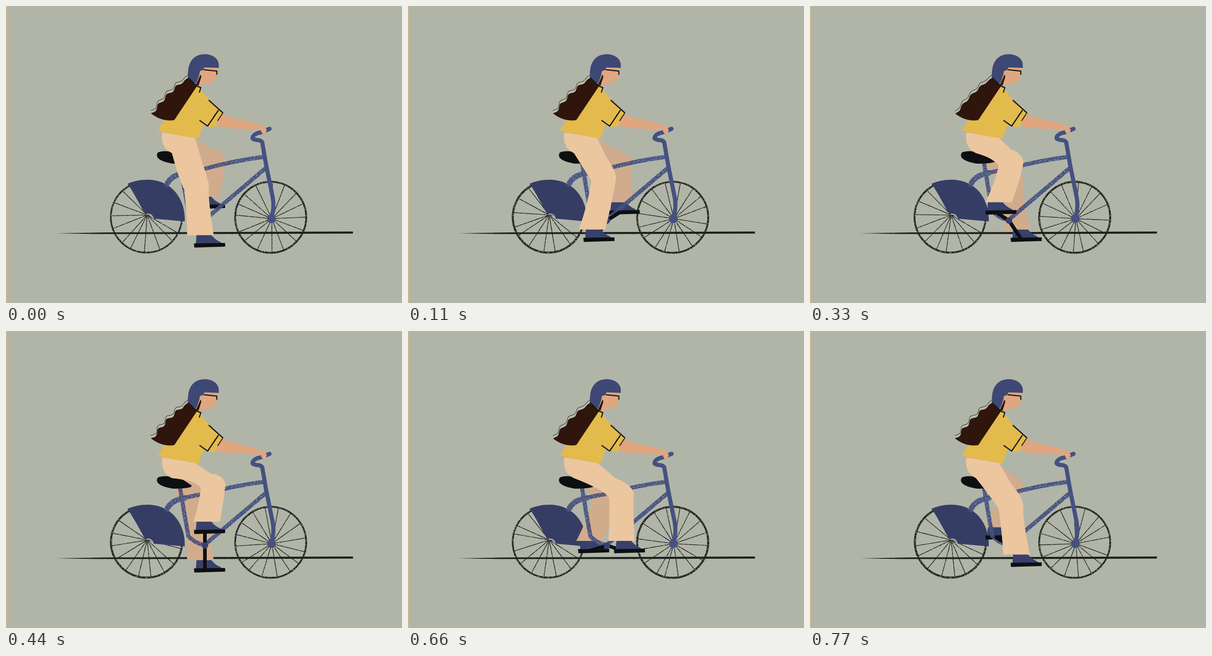
Animation of 864x648 px, one loop 880 ms. Source, as an HTML page:

```html
<!DOCTYPE html>
<html lang="en">
<head>
<meta charset="utf-8">
<title>Cyclist</title>
<style>
  html, body { margin: 0; width: 100%; height: 100%; overflow: hidden; background: #b1b5a8; }
  svg { display: block; width: 100vw; height: 100vh; }
  .pose { visibility: hidden; animation: show 880ms step-end infinite; }
  @keyframes show { 0% { visibility: visible } 12.5%, 100% { visibility: hidden } }
  .line { fill: none; stroke-linecap: round; stroke-linejoin: round; }
  .ink { stroke: #171a18; }
  .tube { stroke: #455180; }
  .blue { fill: #37416c; }
  .black { fill: #0d0f10; }
  .skin { fill: #e0a67f; }
  .hair { fill: #2f150c; }
</style>
</head>
<body>
<svg viewBox="0 0 864 648">
  <defs>
    <filter id="rough" filterUnits="userSpaceOnUse" x="0" y="0" width="864" height="648" color-interpolation-filters="sRGB">
      <feTurbulence type="fractalNoise" baseFrequency=".3" numOctaves="2" seed="4"/>
      <feDisplacementMap in="SourceGraphic" scale="1.6" xChannelSelector="R" yChannelSelector="G"/>
    </filter>
    <filter id="grain" filterUnits="userSpaceOnUse" x="0" y="0" width="864" height="648" color-interpolation-filters="sRGB">
      <feTurbulence type="fractalNoise" baseFrequency=".35" numOctaves="2" seed="9"/>
      <feColorMatrix values="0 0 0 0 0  0 0 0 0 0  0 0 0 0 0  2.2 0 0 0 -.15"/>
      <feComposite in="SourceGraphic" operator="in"/>
    </filter>
  </defs>
  <rect width="864" height="648" fill="#b1b5a8"/>
  <rect width="1.3" height="648" fill="#e3b88e"/>
  <g filter="url(#rough)">
    <path d="M110 496 L220 494 L757 492 V496.5 L450 497.5 L200 497.5Z" fill="#1b2119"/>
    <g id="wheels" filter="url(#grain)"></g>
    <path fill="#363d64" d="M265 388 C300 373 343 376 368 404 C384 422 391 446 390 470 L322 464 C321 456 314 452 304 454 C292 435 280 408 265 388Z"/>
    <path class="line" stroke="#a9ada6" stroke-width="2.5" d="M308 454 Q318 453 321 463"/>
    <g id="farLegs"></g>
    <g class="line tube" stroke-width="9">
      <g filter="url(#grain)">
        <path stroke-width="12" d="M351 389 C358 374 371 368 390 364"/>
        <path d="M385 365 Q410 359 430 356 Q495 338 563 329"/>
        <path d="M380 344 L388 392 L398 448 Q412 463 433 467 L565 355"/>
      </g>
      <path d="M575 268 L555 276 C546 277 537 283 538 289 C545 295 554 290 559 297 L567 344 L582 418 Q586 440 579 462"/>
      <circle cx="579" cy="464" r="5"/>
    </g>
    <path class="black" d="M331 320 C343 313 370 318 387 325 L405 337 C407 343 382 344 365 344 C345 341 323 334 331 320Z"/>
    <g id="cranks"></g>
    <circle class="blue" cx="434" cy="468" r="7"/>
    <g id="nearLegs"></g>
    <path fill="#e3ba4c" d="M409 174 L422 178 Q433 194 444 205 L474 235 L458 263 L441 264 L432 257 L420 289 Q375 283 332 272 Q350 236 368 226Z"/>
    <path class="skin" d="M473 237 C500 247 535 252 563 262 L569 270 L566 280 L559 278 L555 270 C525 268 490 267 470 265 Q458 260 462 249Z"/>
    <path class="line ink" stroke-width="2.6" d="M443 206 L473 233 M463 228 L440 262 L423 250"/>
    <path class="line ink" stroke-width="2" d="M472 235 L462 250"/>
    <path class="skin" d="M430 133 L462 132 L460 150 Q456 169 439 168 L426 173 L416 176 L422 145Z"/>
    <g id="hair"></g>
    <path fill="#3e4874" d="M397 158 C395 127 405 106 434 105 C457 106 467 120 464 135 L433 134 Q429 143 424 141 Q421 155 415 169 L404 164Z"/>
    <path class="hair" d="M425 148 L415 171 L420 174 L426 155Z"/>
    <ellipse class="skin" cx="426" cy="146" rx="3.5" ry="5"/>
    <path class="line ink" stroke-width="2.5" d="M432 139 L460 142 V149 M398 157 L417 175 L425 178 L422 188"/>
  </g>
</svg>
<script>
  const POSES = 8;
  const HIP = { x: 384, y: 300 };
  const FRONT = { x: 412, y: 287 };
  const BRACKET = { x: 434, y: 468 };

  const noise = n => {
    const v = Math.sin(n * 127.1 + 11.7) * 43758.5453;
    return v - Math.floor(v) - 0.5;
  };
  const turn = step => step * 2 * Math.PI / POSES;

  // Step 0 is the bottom of the stroke; the pedal then rises at the back.
  const pedal = step => ({
    x: 444 - 39 * Math.sin(turn(step)),
    y: 480 + 42 * Math.cos(turn(step))
  });

  function leg(step, color) {
    const sole = pedal(step);
    const lean = 2 + 8 * Math.cos(turn(step - 3.3));
    const heel = { x: sole.x - 44 + lean, y: sole.y - 22 };
    const toe = { x: sole.x + 14 + lean, y: sole.y - 22 };
    const ankle = { x: (heel.x + toe.x) / 2, y: heel.y };

    // The knee moves forward and up as the foot comes closer to the hip.
    const reach = Math.hypot(ankle.x - HIP.x, ankle.y - HIP.y);
    const bend = Math.min(1, Math.sqrt(Math.max(0, 206 - reach) / 25));
    const x = (HIP.x + ankle.x) / 2 + 41 * bend;
    const y = (HIP.y + ankle.y) / 2 - 20 * bend;
    const back = { x: x - 27, y: y + 5 };
    const knee = { x: x + 27, y: y - 4 };

    return `<path class="blue" d="M${sole.x - 30} ${sole.y - 2} l2 -23 h30 q8 12 22 18 l8 7Z"/>
      <path class="black" d="M${sole.x - 34} ${sole.y - 4} l68 -1 v8 l-67 2Z"/>
      <path fill="${color}" d="M341 276 C338 300 346 313 362 321
        Q${back.x - 10} ${back.y - 17} ${back.x} ${back.y}
        Q${back.x + (heel.x - back.x) * .4 + 3} ${(back.y + heel.y) / 2} ${heel.x} ${heel.y}
        L${toe.x} ${toe.y} Q${knee.x - 3} ${knee.y + 28} ${knee.x} ${knee.y}
        Q${knee.x - 4} ${knee.y - 20} ${(knee.x + FRONT.x) / 2} ${(knee.y + FRONT.y) / 2}
        L${FRONT.x} ${FRONT.y}Z"/>`;
  }

  function crank(step) {
    const { x, y } = pedal(step);
    return `<path class="line" stroke="#0d0f10" stroke-width="8" d="M${BRACKET.x} ${BRACKET.y} L${x - 10} ${y}"/>`;
  }

  function wheel(cx, cy, hubX, hubY, step, seed) {
    const r = 77.5;
    let spokes = '';
    for (let k = 0; k < 16; k++) {
      const a = turn(k / 2 + step * .2 + noise(k + seed + step * 20) * .2);
      spokes += `M${hubX} ${hubY}L${cx + r * Math.cos(a)} ${cy + r * Math.sin(a)}`;
    }
    return `<g class="line" stroke="#20231f">
      <path stroke-width="1.6" d="${spokes}"/>
      <circle cx="${cx}" cy="${cy}" r="${r}" stroke-width="${4.2 + noise(step + seed)}"/></g>`;
  }

  function hair(step) {
    const amp = 2.6 + noise(step) * 1.6;
    const edge = lift => Array.from({ length: 33 }, (_, i) => {
      const t = i / 32;
      const wave = amp * Math.sin(t * 8 * Math.PI + 1) * Math.min(1, t * 4);
      const out = .7 * (wave + 5 * Math.sin(Math.PI * t));
      return `${397 - 79 * t - out} ${157 + 79 * t - out - lift}`;
    }).join('L');
    return `<path class="hair" d="M${edge(0)} Q340 253 367 249 L418 173Z"/>
      <path class="line" stroke="#c3c5ba" stroke-width="1.2" d="M${edge(3)}"/>
      <path class="line" stroke="#33352f" stroke-width="1.1" d="M${edge(6)}"/>`;
  }

  function fill(id, draw) {
    document.getElementById(id).innerHTML = Array.from({ length: POSES }, (_, i) =>
      `<g class="pose" style="animation-delay:${(i - POSES) * 110}ms">${draw(i)}</g>`).join('');
  }

  fill('wheels', i => wheel(306 + noise(i), 460.5, 308, 456, i, 3) + wheel(577.5, 461, 580, 464, i, 71));
  fill('farLegs', i => leg(i + POSES / 2, '#d1ac8c'));
  fill('cranks', i => crank(i + POSES / 2) + crank(i));
  fill('nearLegs', i => leg(i, '#ebc69f'));
  fill('hair', hair);
</script>
</body>
</html>
```
